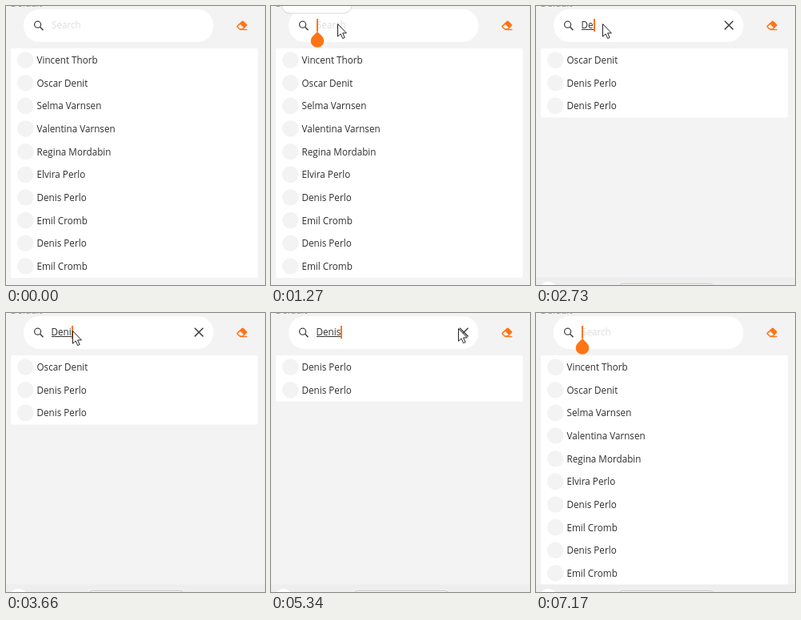
Animation, 324 px wide and 349 px high, one loop 7390 ms. Source, as an HTML page:

```html
<!DOCTYPE html>
<html lang="en">
<head>
<meta charset="utf-8">
<title>Search list</title>
<style>
  html, body { margin: 0; width: 100%; height: 100%; overflow: hidden; background: #f3f3f3; }
  svg { display: block; width: 324px; height: 349px; }
  text { font: 11.7px "Open Sans", "Noto Sans", sans-serif; fill: #2e2e2e; white-space: pre; }
</style>
</head>
<body>
<svg viewBox="0 0 324 349">
  <text x="5.6" y="1" style="fill:#999">Default</text>
  <rect x="22" y="4" width="237.5" height="41" rx="20" fill="#fff"/>
  <g fill="none" stroke="#444" stroke-width="1.3">
    <circle cx="39.6" cy="23.2" r="4"/>
    <path d="M42.6 26.2 46.5 30.2" stroke-width="1.6"/>
  </g>
  <g fill="#ff7414">
    <path fill-rule="evenodd" d="M295.2 18.8Q296 18 296.9 18.8L301.3 23Q302.1 23.9 301.3 24.8L296.6 29.6H292L288.8 26.5Q288 25.6 288.8 24.8ZM293.1 22.9 290 25.7 292.6 28.3H295.9L297.2 26.9Z"/>
    <rect x="292.5" y="28.9" width="9.2" height="1.3"/>
  </g>

  <rect id="panel" x="6" y="53" width="309" rx="2" fill="#fff"/>
  <g id="list"></g>

  <text id="hint" x="57" y="28" style="fill:#dedede">Search</text>
  <text id="query" x="56.5" y="28"></text>
  <rect id="under" x="57" y="29" height="1" fill="#333"/>
  <path id="clear" d="M236 18.8 246.6 29.4M246.6 18.8 236 29.4" stroke="#444" stroke-width="1.5"/>
  <rect id="caret" y="16" width="2" height="16" fill="#ff7414"/>

  <g id="menu">
    <rect x="13" y="-25" width="88.5" height="35" rx="11" fill="#000" opacity=".07"/>
    <rect x="13.5" y="-25" width="87.5" height="34" rx="10.5" fill="#fff" stroke="#dcdcdc" stroke-width=".8"/>
  </g>
  <path id="drop" d="M58 32 63.6 37.4A8.3 8.3 0 1 1 52.4 37.4Z" fill="#ff7414"/>

  <g id="keys">
    <rect y="339.5" width="324" height="10" fill="#eeeeef"/>
    <circle cx="15.5" cy="357" r="12" fill="#fff"/>
    <rect id="keyTop" x="103.5" y="347.5" width="119" height="20" rx="5" fill="#f8f8f8" stroke="#c8c8c8"/>
  </g>
  <path id="arrow" d="M.5 .5V16.2L4.1 12.9 6.7 18.6 9.2 17.5 6.6 11.9H11.4Z" fill="#fff" stroke="#222"/>
</svg>
<script>
const LOOP = 7390, PITCH = 28.65, WORD = 'Denis';
const NAMES = ['Vincent Thorb', 'Oscar Denit', 'Selma Varnsen', 'Valentina Varnsen', 'Regina Mordabin',
  'Elvira Perlo', 'Denis Perlo', 'Emil Cromb', 'Denis Perlo', 'Emil Cromb'];

const CLEAR = 6610;
const TYPED = [[0, 0], [1880, 1], [2730, 2], [3150, 3], [3660, 4], [3900, 5], [CLEAR, 0]];
const CARET = [[60, 560], [1120, 4650], [5150, 5630], [7170, LOOP]];
// time, x, y of the pointer tip
const MOVES = [
  [280, -4, 255], [850, 83, 22], [4920, 83, 22], [5340, 234, 19],
  [5490, 243, 29], [5630, 243, 24], [6470, 243, 24], [6840, -14, 225]
];

const $ = id => document.getElementById(id);
const set = (el, attrs) => { for (const k in attrs) el.setAttribute(k, attrs[k]); };
const show = (id, on) => set($(id), { opacity: +on });
const within = (t, a, b) => t >= a && t < b;
const ramp = (t, a, b) => Math.min(1, Math.max(0, (t - a) / (b - a)));
const ease = p => p * p * (3 - 2 * p);

function make(tag, attrs, parent) {
  const el = document.createElementNS('http://www.w3.org/2000/svg', tag);
  set(el, attrs);
  return parent.appendChild(el);
}

const rows = NAMES.map((_, i) => {
  const g = make('g', { transform: `translate(0 ${i * PITCH})` }, $('list'));
  make('circle', { cx: 24.3, cy: 67.6, r: 10.3, fill: '#f3f3f3' }, g);
  return { g, label: make('text', { x: 38.5, y: 72 }, g) };
});

function fillList(query) {
  const hits = NAMES.filter(n => n.toLowerCase().includes(query.toLowerCase()));
  rows.forEach((row, i) => {
    row.label.textContent = hits[i] || '';
    set(row.g, { visibility: i < hits.length ? 'visible' : 'hidden' });
  });
  set($('panel'), { height: hits.length * PITCH + .5 });
}

function placeArrow(t) {
  const i = MOVES.findIndex(m => t < m[0]);
  show('arrow', i > 0);
  if (i < 1) return;
  const [t0, x0, y0] = MOVES[i - 1], [t1, x1, y1] = MOVES[i];
  const p = ease(ramp(t, t0, t1));
  set($('arrow'), { transform: `translate(${x0 + (x1 - x0) * p} ${y0 + (y1 - y0) * p})` });
}

let lastText = null, lastQuery = null, width = 0;

function render(t) {
  const count = TYPED.filter(s => t >= s[0]).pop()[1];
  const text = WORD.slice(0, count);
  const filtered = within(t, 1980, CLEAR);
  const query = filtered ? text : '';

  if (text !== lastText) {
    $('query').textContent = lastText = text;
    width = count ? $('query').getComputedTextLength() : 0;
  }
  if (query !== lastQuery) fillList(lastQuery = query);

  // the last letter is underlined a little late
  const late = count === 5 && t < 4130 ? 7.2 : 0;
  set($('under'), { width: Math.max(0, width - late) });
  set($('caret'), { x: Math.round(56.6 + width) });
  show('caret', CARET.some(([a, b]) => within(t, a, b)));
  show('hint', !count);
  show('clear', filtered);

  set($('menu'), { opacity: t < 1880 ? ramp(t, 1080, 1270) : 0 });
  set($('drop'), { opacity: t < 3000 ? ramp(t, 1080, 1220) * (1 - ramp(t, 1470, 1590)) : ramp(t, CLEAR, 6740) });
  show('keys', t >= 1980);
  set($('keyTop'), { opacity: ramp(t, 2070, 2170) });
  placeArrow(t);
}

const start = performance.now();
function frame() {
  render((performance.now() - start) % LOOP);
  requestAnimationFrame(frame);
}
frame();
</script>
</body>
</html>
```
